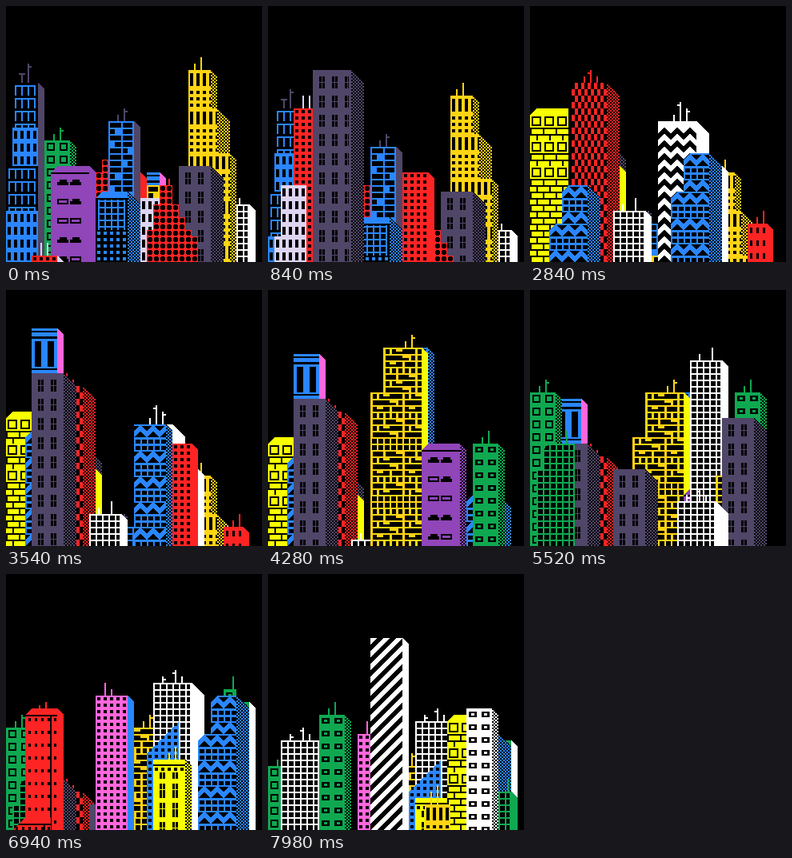
Recreate the animation shown at these times as an HTML page with a canvas. Size 320 by 320 pixels, loop 8 s.

```html
<!DOCTYPE html>
<html lang="en">
<head>
<meta charset="utf-8">
<title>Rising city</title>
<style>
html, body { margin: 0; width: 100%; height: 100%; overflow: hidden; background: #000; }
canvas { display: block; width: 320px; height: 320px; image-rendering: pixelated; }
</style>
</head>
<body>
<canvas id="stage" width="320" height="320"></canvas>
<script>
const SIZE = 320, TILE = 8, PAD = 32, LOOP = 8000, STEP = 20;

const hex = {
  B: '2a86ff', R: 'ff2424', Y: 'ffd414', L: 'f8ff00', G: '0fa850',
  P: '9045b8', D: '504668', V: 'ddd4f0', K: 'ff66dc', W: 'ffffff'
};
const BLACK = 0xff000000;
const ink = {};
for (const k in hex) {
  const n = parseInt(hex[k], 16);
  ink[k] = (BLACK | (n & 255) << 16 | n & 0xff00 | n >> 16) >>> 0;
}

const within = (v, a, b) => v >= a && v <= b;
const check = (x, y) => ((x >> 1) + (y >> 1)) % 2 === 1;
const ring = (x, y, x0, x1, y0, y1) =>
  within(x, x0, x1) && within(y, y0, y1) &&
  !(within(x, x0 + 2, x1 - 2) && within(y, y0 + 2, y1 - 2));

// Facade patterns: true where the facade is coloured.
const pats = {
  stripe: (x, y) => (x + y) % 16 < 8,
  zigzag: (x, y) => y < 8 || (y + 16 - Math.floor(Math.abs(x % 16 - 7.5))) % 16 < 8,
  grid: (x, y, w) => x % 8 < 2 || y % 8 < 2 || x >= w - 2,
  dots: (x, y) => !(within(x % 8, 2, 5) && within(y % 8, 2, 5)),
  holes: (x, y) => Math.hypot(x % 8 - 3.5, y % 8 - 3.5) > 3.2,
  dash: (x, y) => x > 3 && ((x >> 2) + (y >> 3)) % 2 === 0,
  panes: (x, y, w) => within(x, 3, w - 4) && y % 16 > 2 && (y % 16 < 5 || within(x % 8, 3, 4)),
  slats: (x, y) => !(within(x % 8, 2, 5) && within(y % 16, 4, 13)),
  ports: (x, y) => !(within(x % 8, 3, 5) && within(y % 16, 5, 11)),
  squares: (x, y) => !ring(x % 16, y % 16, 3, 12, 3, 12),
  wins: (x, y) => {
    const u = x % 16, v = y % 16;
    return !(within(u, 3, 12) && within(v, 4, 10)) || (within(u, 6, 9) && within(v, 6, 8));
  },
  twin: (x, y, w) => {
    const u = x % 16, v = y % 24;
    return x > w - 4 || !((within(u, 8, 10) || within(u, 12, 14)) &&
      (within(v, 8, 14) || within(v, 16, 22)));
  },
  flat: (x, y, w) => {
    if (within(y, 8, 9)) return false;
    const a = (x + 8) % 16, v = y % 24;
    if (x < 8 || x >= w - 8 || a > 13 || !within(v, 17, 23)) return true;
    const row = y / 24 | 0, col = (x - 8) >> 4, kind = row % 3;
    const open = kind === 2 || kind === 1 && col === (row >> 2) % 2;
    return open ? !ring(a, v, 0, 13, 17, 23) : v < 20 && (a < 3 || a > 11);
  },
  spots: (x, y, w) => !within(y, 8, 9) && !(x > w - 10 && x < w - 7 && y > 8) &&
    !(within(x % 8, 4, 6) && within(y % 16, 12, 15)),
  brick: (x, y) => {
    if (y < 8) return true;
    const v = (y - 8) % 32;
    if (v < 16 && y < 96) return !ring(x % 16, v, 2, 13, 2, 13);
    return v % 8 > 1 && (x + (v >> 3) % 2 * 8) % 16 > 1;
  },
  maze: (x, y) => {
    const c = x >> 3, r = y >> 3, n = (c * 7 + r * 5 + c * r) % 5;
    if (y % 8 < 2) return true;
    if (r % 9 > 6) return x % 8 < 2;
    return n === 4 ? y % 8 < 5 : n % 2 === 0 && x % 8 < 3;
  },
  wide: (x, y, w) => y % 8 < 2 || x % 16 < 2 || x >= w - 2 ||
    ((x >> 3) * 3 + (y >> 3) * 5) % 7 === 1,
  deco: (x, y) => {
    const v = y % 32, d = 7.5 - Math.abs(x % 16 - 7.5);
    return v < 8 ? d > 7 - v || v < 2 : v < 16 ? d < 16 - v : x % 8 < 2 || y % 8 < 3;
  },
  tall: (x, y) => {
    const v = y % 56;
    return v < 4 || !within(x % 8, 2, 5) || !(v < 24 ? v < 20 : within(y % 8, 2, 5));
  },
  bank: (x, y, w) => {
    if (y < 10) return y < 8;
    if (y < 48) return within(x, 3, w - 4) && (within(x % 8, 3, 4) || within(y % 8, 3, 4));
    return within(x % 8, 2, 5) && within(y % 8, 2, 5);
  },
  bars: (x, y) => {
    if (y < 16) return !within(y, 6, 7) && !(within(y, 10, 13) && x % 8 < 6 && x % 8 > 1);
    return !(within(x % 16, 8, 10) || within(x % 16, 12, 14)) || y % 24 < 6 || y % 24 === 13;
  },
  pillar: (x, y) => !(within(y, 3, 4) || within(y, 10, 12)) &&
    !(within(y, 16, 47) && (within(x, 4, 11) || within(x, 20, 27))) && !within(y, 50, 51)
};

// Uppercase side = solid, lowercase = dithered; cut = slanted left corner in px.
const box = (x, w, d, dy, pat, col, side, cut = 0) => ({ x, w, d, dy, pat, col, side, cut });
// tick: -1 left, 1 right, 2 both
const mast = (x, len, tick = 0, col) => ({ x, len, tick, col });

function tower(h, x, w, d, pat, col, side, cut, ...extras) {
  const parts = [box(x, w, d, 0, pat, col, side, cut), ...extras.filter(e => e.pat)];
  const img = new ImageData(SIZE, h * TILE + PAD);
  const px = new Uint32Array(img.data.buffer);
  const put = (X, Y, c) => { if (X >= 0 && X < SIZE && Y >= 0 && Y < img.height) px[Y * SIZE + X] = c; };

  for (const p of parts) {
    const fw = p.w * TILE, full = fw + p.d * TILE, y0 = PAD + p.dy * TILE;
    const c = ink[p.col], shade = p.side && ink[p.side.toUpperCase()];
    const solid = p.side === (p.side || '').toUpperCase();
    for (let y = 0; y + y0 < img.height; y++) {
      for (let i = 0; i < full; i++) {
        const u = i - fw;
        if (y < p.cut - i || y < u) continue;
        const on = u < 0 ? pats[p.pat](i, y, fw) : solid || check(i, y);
        put(p.x * TILE + i, y0 + y, on ? (u < 0 ? c : shade) : BLACK);
      }
    }
  }
  for (const m of extras.filter(e => e.len)) {
    const c = ink[m.col || col], top = PAD - m.len;
    for (let y = 0; y < m.len; y++) { put(m.x, top + y, c); put(m.x + 1, top + y, c); }
    for (let i = 0; i < 3; i++) {
      for (const r of m.tick > 1 ? [0, 1] : [3, 4]) {
        if (m.tick > 0) put(m.x + 2 + i, top + r, c);
        if (m.tick < 0 || m.tick > 1) put(m.x - 1 - i, top + r, c);
      }
    }
  }
  const cv = document.createElement('canvas');
  cv.width = SIZE;
  cv.height = img.height;
  cv.getContext('2d').putImageData(img, 0, 0);
  return { h, cv };
}

const standing = [
  tower(28, 1, 4, 1, 'panes', 'B', 'D', 0, box(1, 4, 0, 7, 'slats', 'B'),
    box(0, 5, 0, 13, 'panes', 'B'), box(0, 5, 0, 20, 'slats', 'B'),
    mast(19, 12, 2, 'D'), mast(27, 24, 1, 'D')),
  tower(30, 28.5, 3.5, 1, 'tall', 'Y', 'y', 0, box(28.5, 4.5, 2, 6, 'tall', 'Y', 'y'),
    box(28.5, 6.5, 1, 13, 'tall', 'Y', 'y'), mast(235, 8), mast(243, 16)),
  tower(16, 15, 1, 0, 'holes', 'R', '', 0, box(14, 7, 1, 2, 'holes', 'R', 'R')),
  tower(22, 16, 4, 1, 'wide', 'B', 'D', 0, mast(139, 8, 0, 'D'), mast(147, 16, 1, 'D')),
  tower(19, 6, 4, 1, 'squares', 'G', 'g', 0, mast(59, 8), mast(67, 16, 1)),
  tower(14, 22, 2, 1, 'pillar', 'B', 'K', 0, box(22, 2, 0, 2, 'wide', 'Y')),
  tower(15, 27, 5, 2, 'twin', 'D', 'd', 0),
  tower(11, 14, 5, 2, 'bank', 'B', 'b', 8),
  tower(10, 21, 3, 0, 'slats', 'V', '', 0),
  tower(15, 7, 6, 1, 'flat', 'P', 'P', 8),
  tower(12, 24, 2, 0, 'holes', 'R', '', 0, box(23, 4, 0, 3, 'holes', 'R'),
    box(23, 5, 0, 5, 'holes', 'R'), box(22, 7, 0, 7, 'holes', 'R'),
    box(22, 8, 0, 8, 'holes', 'R'), mast(203, 8)),
  tower(9, 36, 2, 1, 'grid', 'W', 'W', 0, mast(291, 8))
];

// Each one rises in turn; when it is done the whole city sinks by one tile.
const rising = [
  tower(28, 4, 4, 1, 'dots', 'R', 'V', 0, mast(43, 16, 0, 'V'), mast(51, 16, 0, 'V')),
  tower(17, 21, 4, 1, 'dots', 'R', 'R', 0),
  tower(18, 7, 4, 1, 'flat', 'P', 'P', 8),
  tower(31, 7, 6, 2, 'twin', 'D', 'd', 0),
  tower(16, 2, 4, 0, 'slats', 'V', '', 0, box(1, 5, 0, 8, 'slats', 'V')),
  tower(12, 19, 3, 0, 'maze', 'Y', '', 0, box(16, 6, 0, 5, 'maze', 'Y')),
  tower(33, 6, 5, 1, 'stripe', 'W', 'W', 0),
  tower(24, 28, 2, 1, 'stripe', 'W', 'W', 0),
  tower(30, 20, 6, 2, 'zigzag', 'W', 'W', 0, mast(179, 8), mast(187, 24, -1), mast(195, 16, 1)),

  tower(22, 10, 4, 1, 'brick', 'L', 'L', 0),
  tower(30, 0, 6, 0, 'brick', 'L', '', 8),
  tower(22, 24, 4, 2, 'deco', 'B', 'b', 8, box(22, 6, 2, 6, 'deco', 'B', 'b', 8)),
  tower(13, 7, 4, 1, 'wins', 'G', 'g', 0),
  tower(31, 6, 6, 2, 'dash', 'R', 'r', 0, mast(67, 8), mast(75, 16, -1), mast(83, 8)),
  tower(10, 13, 5, 1, 'grid', 'W', 'W', 0, mast(115, 8), mast(131, 16)),
  tower(7, 34, 3, 1, 'ports', 'R', 'R', 0, mast(283, 8), mast(291, 16)),
  tower(27, 5, 4, 2, 'deco', 'B', 'b', 8, box(3, 6, 2, 6, 'deco', 'B', 'b', 8)),

  tower(36, 4, 4, 1, 'pillar', 'B', 'K', 0, box(4, 5, 2, 7, 'twin', 'D', 'd')),
  tower(17, 25, 4, 1, 'dots', 'R', 'R', 0),
  tower(35, 20, 5, 1, 'deco', 'B', 'b', 0),
  tower(34, 18, 6, 1, 'maze', 'Y', 'L', 0, box(16, 8, 0, 7, 'maze', 'Y'),
    mast(171, 8), mast(179, 16, 1)),
  tower(18, 24, 6, 1, 'flat', 'P', 'p', 8),
  tower(9, 31, 5, 2, 'deco', 'B', 'b', 8),
  tower(31, 32, 4, 1, 'wins', 'G', 'g', 0, mast(267, 8), mast(275, 16)),

  tower(30, 0, 4, 1, 'squares', 'G', 'g', 0, mast(11, 8), mast(19, 16, 1)),
  tower(34, 25, 5, 1, 'grid', 'W', 'W', 0, mast(211, 8), mast(227, 16)),
  tower(24, 30, 5, 2, 'twin', 'D', 'd', 0),
  tower(15, 13, 5, 2, 'twin', 'D', 'd', 0),
  tower(13, 29, 1, 0, 'maze', 'Y', '', 0),
  tower(17, 2, 5, 0, 'grid', 'G', '', 8, box(1, 6, 0, 4, 'grid', 'G'), mast(45, 16)),
  tower(31, 23, 6, 2, 'grid', 'W', 'W', 0, mast(195, 8, 1), mast(211, 16, -1), mast(219, 8)),

  tower(27, 32, 6, 1, 'squares', 'G', 'W', 0, box(34, 2, 0, -2, 'wins', 'G'), mast(283, 32)),
  tower(27, 32, 4, 2, 'deco', 'B', 'b', 8, box(30, 6, 2, 6, 'deco', 'B', 'b', 8)),
  tower(24, 3, 5, 1, 'spots', 'R', 'R', 8, mast(41, 4), mast(49, 8)),
  tower(25, 14, 5, 1, 'dots', 'K', 'B', 0, mast(123, 16), mast(131, 8)),
  tower(20, 22, 5, 0, 'dots', 'B', '', 40),
  tower(13, 23, 5, 1, 'bars', 'L', 'l', 0, mast(203, 8), mast(211, 16)),
  tower(3, 1, 6, 0, 'spots', 'R', '', 16),
  tower(36, 16, 5, 1, 'stripe', 'W', 'W', 0),

  tower(19, 2, 6, 0, 'grid', 'W', '', 0, mast(27, 8, 1), mast(43, 16, -1), mast(51, 8)),
  tower(22, 8, 4, 1, 'wins', 'G', 'g', 0, mast(75, 8), mast(83, 16)),
  tower(21, 28, 4, 1, 'brick', 'L', 'L', 8),
  tower(21, 31, 4, 1, 'wins', 'W', 'w', 0),
  tower(7, 36, 2, 1, 'grid', 'G', 'G', 0, mast(299, 16)),
  tower(20, 24.5, 4, 0, 'tall', 'Y', '', 0, mast(203, 16), mast(211, 24))
];

// done[k] = tiles raised before tower k starts
const done = [0];
rising.forEach((b, k) => done.push(done[k] + b.h));

// [time, tower, tiles raised of it]
const pace = [[0, 0, 1], [1640, 8, 27], [2840, 16, 12], [4280, 23, 16],
  [5520, 30, 7], [6940, 38, 0], [7980, 44, 4]].map(([t, k, n]) => [t, done[k] + n]);

function raisedAt(t) {
  let i = 1;
  while (i < pace.length - 1 && t > pace[i][0]) i++;
  const [t0, a] = pace[i - 1], [t1, b] = pace[i];
  return Math.floor(a + (b - a) * (t - t0) / (t1 - t0) + 1e-6);
}

const ctx = document.getElementById('stage').getContext('2d');

function draw(ms) {
  const total = raisedAt(Math.floor(ms / STEP) * STEP);
  let now = 0;
  while (now < rising.length - 1 && done[now + 1] <= total) now++;

  ctx.fillStyle = '#000';
  ctx.fillRect(0, 0, SIZE, SIZE);
  const place = (b, tiles) => {
    if (tiles > 0) ctx.drawImage(b.cv, 0, SIZE - tiles * TILE - PAD);
  };
  standing.forEach(b => place(b, b.h - now));
  for (let k = 0; k < now; k++) place(rising[k], rising[k].h - (now - k));
  place(rising[now], total - done[now]);
}

let start;
function tick(t) {
  if (start === undefined) start = t;
  draw((t - start) % LOOP);
  requestAnimationFrame(tick);
}
draw(0);
requestAnimationFrame(tick);
</script>
</body>
</html>
```
